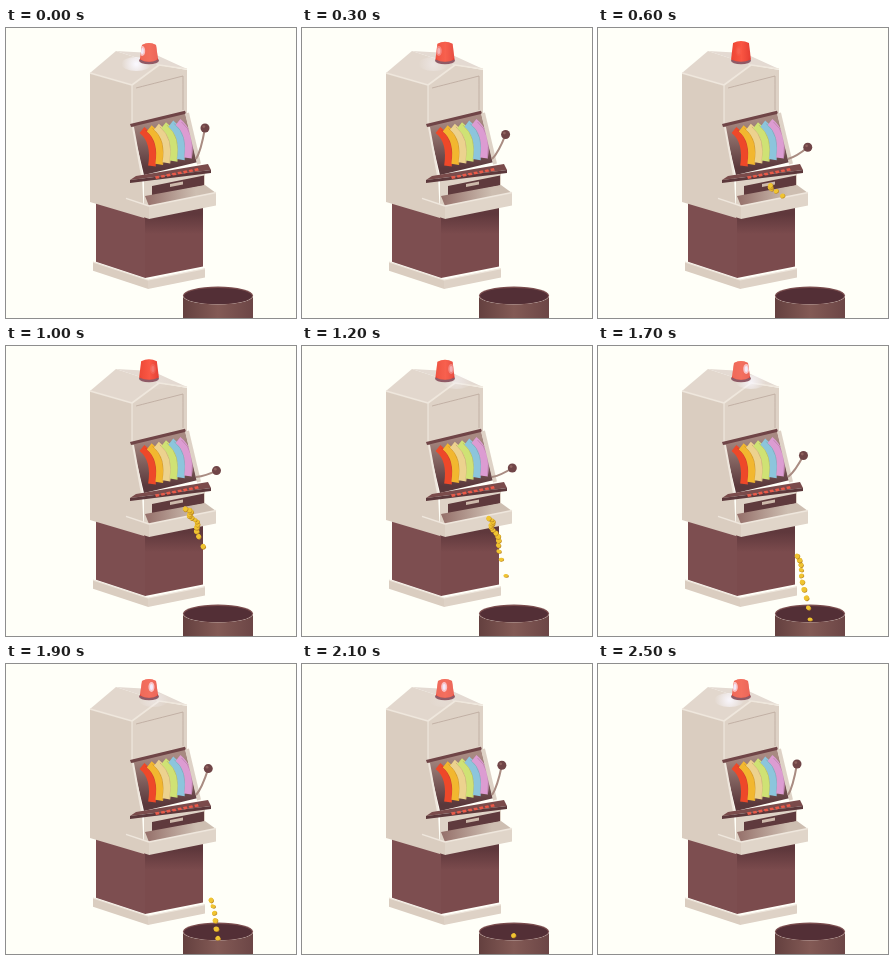
Animation, 290 px wide and 290 px high, one loop 2600 ms. Source, as an HTML page with a canvas:

```html
<!DOCTYPE html>
<html lang="en">
<head>
<meta charset="utf-8">
<title>Slot machine</title>
<style>
html, body { margin: 0; width: 100%; height: 100%; overflow: hidden; background: #fffff8; }
canvas { display: block; width: 290px; height: 290px; }
</style>
</head>
<body>
<canvas id="stage"></canvas>
<script>
const LOOP = 2600, STEP = 100, SIZE = 290, TAU = Math.PI * 2;
const RIGHT = -0.2, LEFT = 0.33; // slopes of the front and side faces
const CREAM = '#ded2c6', SIDE = '#dacdc0', LIGHT = '#efe7dd', DARK = '#704547';
const canvas = document.getElementById('stage');
const dpr = window.devicePixelRatio || 1;
canvas.width = canvas.height = SIZE * dpr;
const ctx = canvas.getContext('2d');
ctx.scale(dpr, dpr);

const mix = (a, b, u) => a + (b - a) * u;
const clamp = u => Math.min(1, Math.max(0, u));
const ease = u => (1 - Math.cos(Math.PI * clamp(u))) / 2;

function poly(fill, ...p) {
  ctx.beginPath();
  for (let i = 0; i < p.length; i += 2) ctx.lineTo(p[i], p[i + 1]);
  ctx.closePath();
  ctx.fillStyle = fill;
  ctx.fill();
}

// Parallelogram: top edge of width w, then dropped by h and shifted by dx.
function slab(fill, x, y, w, h, dx = 0, slope = RIGHT) {
  const y2 = y + w * slope;
  poly(fill, x, y, x + w, y2, x + w + dx, y2 + h, x + dx, y + h);
}

// Front and side of a box whose near top corner is x, y.
function box(x, y, w, d, h, front, side) {
  slab(side, x - d, y - d * LEFT, d + 0.3, h, 0, LEFT);
  slab(front, x, y, w, h);
}

function curve(color, width, x0, y0, cx, cy, x1, y1) {
  ctx.beginPath();
  ctx.moveTo(x0, y0);
  ctx.quadraticCurveTo(cx, cy, x1, y1);
  ctx.strokeStyle = color;
  ctx.lineWidth = width;
  ctx.stroke();
}

const line = (color, width, x0, y0, x1, y1) => curve(color, width, x0, y0, x0, y0, x1, y1);

function oval(fill, x, y, rx, ry = rx, turn = 0) {
  ctx.beginPath();
  ctx.ellipse(x, y, rx, ry, turn, 0, TAU);
  ctx.fillStyle = fill;
  ctx.fill();
}

function shade(x0, y0, x1, y1, ...colors) {
  const g = ctx.createLinearGradient(x0, y0, x1, y1);
  colors.forEach((c, i) => g.addColorStop(i / (colors.length - 1), c));
  return g;
}

function drawBase() {
  box(142, 252, 57, 55, 9, CREAM, SIDE);
  line(LIGHT, 1.2, 87, 234, 142, 252);
  line(LIGHT, 1.2, 142, 252, 199, 240.6);
  box(139, 186, 58, 49, 64, shade(0, 186, 0, 206, '#5f383c', '#7b4b4d'), '#7d4e50');
}

function drawBody() {
  poly(SIDE, 84, 45, 126, 57, 126, 95, 136, 148, 138, 190, 84, 174);
  poly(CREAM, 126, 57, 153, 37, 181, 42, 181, 86, 126, 97);
  poly('#e2d7cd', 84, 45, 110, 23, 153, 37, 126, 57);
  poly('#e4dad2', 110, 23, 146, 25, 181, 41, 153, 37);
  line(LIGHT, 1.6, 84, 45, 126, 57);
  line(LIGHT, 1.6, 126, 57, 153, 37);
  line(LIGHT, 1.6, 153, 37, 181, 41);
  line(LIGHT, 1.2, 126, 57, 126, 96);
  line('#baa79c', 0.8, 130, 60, 177, 48);
  line('#baa79c', 0.8, 177, 48, 177, 82);
}

function drawReels() {
  slab(shade(0, 92, 0, 140, '#a88a82', '#5a383b'), 126, 97, 53, 50, 12, -0.24);
  ['#ee4829', '#f2b72f', '#ecd28e', '#cfe274', '#8cc5dc', '#dc9cd2'].forEach((color, i) => {
    const x = 136 + i * 7.2, y = 102 - i * 1.6;
    curve(color, 7.8, x, y, x + 14, y + 11, x + 10, y + 36);
    curve('rgba(100,60,60,.3)', 0.7, x + 3.5, y, x + 17.5, y + 11, x + 13.5, y + 36);
  });
  slab(DARK, 124, 96, 55, 3, 1, -0.24);
  line(LIGHT, 2, 127, 99, 136, 148);
  line(CREAM, 4, 181, 85, 193, 136);
}

function drawConsole() {
  slab(CREAM, 138, 152, 61, 28);
  slab('#5f3a3d', 146, 158, 52, 10);
  slab('#cdb9ab', 164, 156, 13, 3);
  poly('#7a4b4b', 130, 148, 202, 136, 205, 142, 124, 152);
  slab('#5c383b', 124, 152, 81, 3, 0, -0.125);
  for (let i = 0; i < 8; i++) slab('#ea5a49', 149 + i * 5.6, 148.5 - i * 1.1, 3.6, 2.4, 1);
}

function drawTray() {
  poly(shade(140, 0, 190, 0, '#96716b', '#cdbeb1'), 139, 168, 199, 157, 210, 165, 143, 178);
  box(143, 178, 67, 23, 13, '#e0d5c9', SIDE);
  line(LIGHT, 1.5, 120, 170.4, 143, 178);
  line(LIGHT, 1.5, 143, 178, 210, 164.6);
}

function drawLever(t) {
  const d = t < 880 ? ease(t / 880) : 1 - ease((t - 880) / 1420);
  const x = 190 + mix(9, 20.5, Math.sin(d * Math.PI / 2));
  const y = mix(100, 125, d);
  curve('#a98c82', 2, 190, 131, mix(195, 200, d), mix(123, 130, d), x, y);
  oval(DARK, x, y, 4.5);
  oval('#8f625e', x - 1.2, y - 1.4, 1.4);
}

function drawSiren(t) {
  // The lamp turns once per loop: left, back, right, front.
  const a = (t - 100) / LOOP * TAU;
  const x = 143 - 7 * Math.cos(a), front = -Math.sin(a);
  const lit = clamp(front * 0.8 + 0.8);
  const glow = lit * Math.abs(Math.cos(a));
  const gx = 143 - 13 * Math.cos(a);
  const g = ctx.createRadialGradient(gx, 36, 1, gx, 36, 15);
  g.addColorStop(0, `rgba(250,248,255,${glow})`);
  g.addColorStop(1, 'rgba(250,248,255,0)');
  oval(g, gx, 36, 15, 7);

  const top = mix(13, 15, lit), w = mix(9, 8, lit);
  oval('#8f5a66', 143, 32.5, 10, 3.8);
  ctx.beginPath();
  ctx.moveTo(142 - w, 31.5);
  ctx.lineTo(144 - w, top + 2);
  ctx.quadraticCurveTo(143, top - 2, 142 + w, top + 2);
  ctx.lineTo(144 + w, 31.5);
  ctx.quadraticCurveTo(143, 36, 142 - w, 31.5);
  ctx.fillStyle = shade(134, 0, 153, 0, '#ee4432', '#fa5440', '#e23a30');
  ctx.fill();
  ctx.save();
  ctx.clip();
  ctx.globalAlpha = lit;
  oval('rgba(240,130,115,.6)', 143, 24, 10, 12);
  oval('#f9c3c6', x, 23, 3, 5);
  oval('#f3eafa', x, 23, 1.5, 3);
  ctx.restore();
}

function drawCoin(x, y, spin) {
  const w = mix(1.6, 2.7, Math.abs(Math.cos(spin)));
  oval('#bd8a25', x + 0.5, y + 0.6, w, 2.6, spin);
  oval('#f0c431', x, y, w, 2.4, spin);
}

function drawCoins(t) {
  const count = 14, roll = 0.12;
  for (let i = 0; i < count; i++) {
    const u = (i / (count - 1)) ** 0.7;
    const age = (t - mix(500, 980, u)) / 1000;
    const s = Math.max(0, age) * mix(1.25, 1, u);
    const drop = 45 * s + 42 * s ** 3;
    if (age < -roll || drop > 122) continue;
    const out = clamp(1 + age / roll);
    const sway = 2.5 * Math.sin(i * 5.3) * (1 - drop / 122);
    drawCoin(mix(170, 177, out) + 3 * drop ** 0.52 + sway, mix(157, 162, out) + drop, i + s * 9);
  }
}

function drawBucketFront() {
  ctx.beginPath();
  ctx.ellipse(212, 268, 35, 8.5, 0, Math.PI, 0, true);
  ctx.lineTo(247, SIZE);
  ctx.lineTo(177, SIZE);
  ctx.fillStyle = shade(177, 0, 247, 0, '#64403f', '#835a55', '#6c4646');
  ctx.fill();
}

function draw(t) {
  ctx.fillStyle = '#fffff8';
  ctx.fillRect(0, 0, SIZE, SIZE);
  drawBase();
  drawBody();
  drawReels();
  drawLever(t);
  drawConsole();
  drawTray();
  drawSiren(t);
  oval('#7a4c4d', 212, 267.5, 35, 9);
  oval('#532f36', 212, 268, 34, 8);
  drawCoins(t);
  drawBucketFront();
}

const start = performance.now();
function tick() {
  const t = (performance.now() - start) % LOOP;
  draw(Math.floor(t / STEP) * STEP);
  requestAnimationFrame(tick);
}
tick();
</script>
</body>
</html>
```
